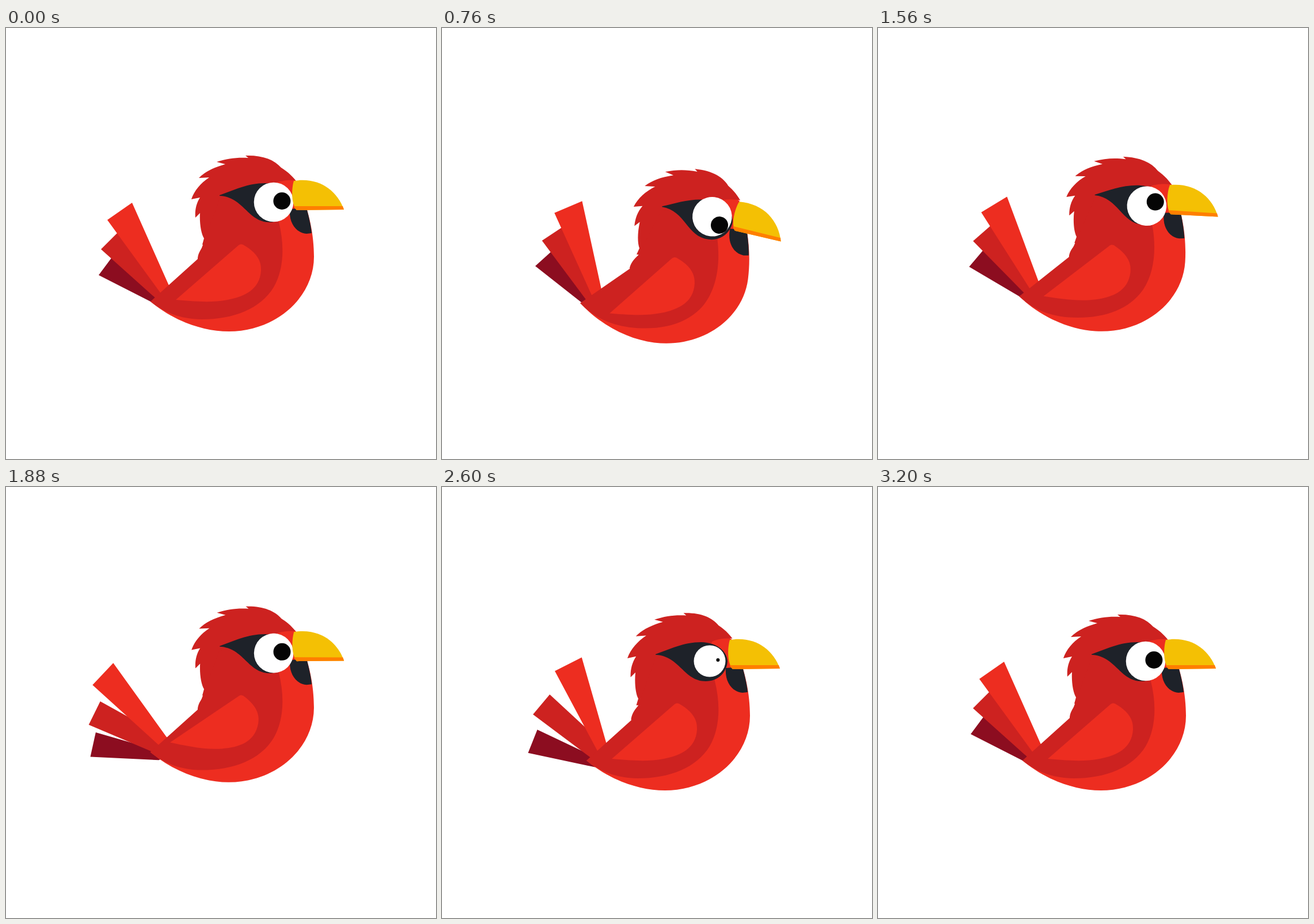
An HTML page that plays this animation: 747 by 750 pixels, repeating every 3.24 s.

```html
<!DOCTYPE html>
<html lang="en">
<head>
<meta charset="utf-8">
<title>Cardinal</title>
<style>
  html, body { margin: 0; width: 100%; height: 100%; overflow: hidden; background: #fff; }
  svg { display: block; width: 100%; height: 100%; }
  .bright { fill: #ed2d20; }
  .dark { fill: #cd2220; }
  .deep { fill: #8c0d20; }
  .black { fill: #1e2229; }
</style>
</head>
<body>
<svg viewBox="0 0 747 750">
  <g id="bird">
    <path id="tailLow" class="deep" d="M161 430L187 395L275 470L280 484L267 484Z"/>
    <path id="tailMid" class="dark" d="M165 385L197 353L285 450L272 481Z"/>
    <path id="tailTop" class="bright" d="M176 334L219 304L283 448L298 470L285 484Z"/>

    <path class="bright" d="M251 476C292 510 342 528 387 528C470 528 535 468 535 398C535 358 526 312 503 265L480 250L430 275L350 430Z"/>
    <path id="crest" class="dark" d="M503 265C494 254 486 248 478 243C466 229 445 221 416 222L421 226C400 225 385 227 366 233L381 237C360 243 346 250 335 261L353 260C338 270 327 283 322 298L337 295C330 306 328 318 329 330L337 322C336 340 339 358 344 366L341 377L345 377C337 386 333 394 333 402L420 400L468 270C475 266 490 264 503 265Z"/>
    <path class="dark" d="M251 476L333 402L370 300L440 275L470 285L474 338C484 378 483 420 465 451C442 489 395 507 340 507C300 506 275 495 251 476Z"/>
    <path id="wing" class="bright" d="M295 473L404 378Q409 374 415 379C435 391 444 405 443 422C441 455 415 467 385 473C355 479 320 475 295 473Z"/>

    <path class="black" d="M493 315C491 340 505 357 522 358L531 357C530 345 526 328 522 313Z"/>
    <path class="black" d="M371 291C396 282 420 270 450 270C480 271 495 287 496 303C495 322 480 338 458 338C420 338 413 294 371 292Z"/>
    <circle id="eye" fill="#fff"/>
    <circle id="pupil" fill="#050505"/>
    <g id="beak">
      <path fill="#f4c004" d="M500 266C543 259 575 282 587 316L505 317C495 306 496 279 500 266Z"/>
      <path fill="#ff7f00" d="M500 310L585 310L587 316L505 317Q501 314 500 310Z"/>
    </g>
  </g>
</svg>
<script>
const LOOP = 3240, STEP = 40;

const rest = { lift: 0, wing: 0, droop: 0, fan: 0, puff: 0, shock: 0 };
const soar = { ...rest, lift: -21, wing: 10, droop: 36, fan: 0.8 };
const crouch = { ...rest, lift: 22, wing: -8, droop: -5, puff: 1 };
const perch = { ...rest, droop: 15, puff: 1 };
const startled = { ...perch, fan: 1, shock: 1 };

const moves = [
  [0, rest], [400, soar], [800, crouch], [1200, soar], [1560, rest], [1720, rest],
  [1980, soar], [2200, perch], [2520, startled], [2600, startled],
  [2680, crouch], [2840, soar], [3160, rest], [LOOP, rest]
];

const $ = id => document.getElementById(id);
const mix = (a, b, f) => a + (b - a) * f;

function ease(from, to, t) {
  const f = Math.min(1, Math.max(0, (t - from) / (to - from)));
  return (1 - Math.cos(Math.PI * f)) / 2;
}

function poseAt(t) {
  const next = moves.findIndex(([time]) => time > t);
  const [t0, a] = moves[next - 1], [t1, b] = moves[next];
  const pose = {};
  for (const name in rest) pose[name] = mix(a[name], b[name], ease(t0, t1, t));
  return pose;
}

function turn(id, angle, x, y, dx = 0, dy = 0) {
  $(id).setAttribute('transform', `translate(${dx} ${dy}) rotate(${angle} ${x} ${y})`);
}

function circle(id, cx, cy, r) {
  for (const [name, value] of Object.entries({ cx, cy, r })) $(id).setAttribute(name, value);
}

function draw(t) {
  const p = poseAt(t);

  // The bird leans forward for the first two hops, glancing down and then up.
  const forward = ease(80, 640, t) * (1 - ease(1160, 1960, t));
  const glance = forward * Math.cos(Math.PI * (t - 760) / 1000);
  const lean = 7.2 * forward;

  turn('bird', lean, 390, 380, 0, p.lift);
  turn('wing', p.wing, 408, 385, -0.5 * lean);
  turn('beak', 6.7 * Math.max(0, glance) ** 2, 500, 290);

  // Feathers droop together; the fan lifts the upper ones more.
  turn('tailTop', 23 * p.fan - p.droop, 285, 470);
  turn('tailMid', 10 * p.fan - p.droop, 285, 470);
  turn('tailLow', -p.droop, 280, 490);

  const shear = -0.045 * p.puff, stretch = 1 + 0.035 * p.puff;
  $('crest').setAttribute('transform',
    `translate(0 300) matrix(1 0 ${shear} ${stretch} 0 0) translate(0 -300)`);

  const eyeX = 465 - 0.75 * lean, eyeY = 303 - 5 * glance;
  circle('eye', eyeX, eyeY, mix(34.3, 27.5, p.shock));
  circle('pupil', eyeX + 14.4, eyeY - 2 + 15 * glance, mix(15, 3, p.shock));
}

const start = performance.now();
function frame() {
  const t = (performance.now() - start) % LOOP;
  draw(Math.floor(t / STEP) * STEP);
  requestAnimationFrame(frame);
}
frame();
</script>
</body>
</html>
```
